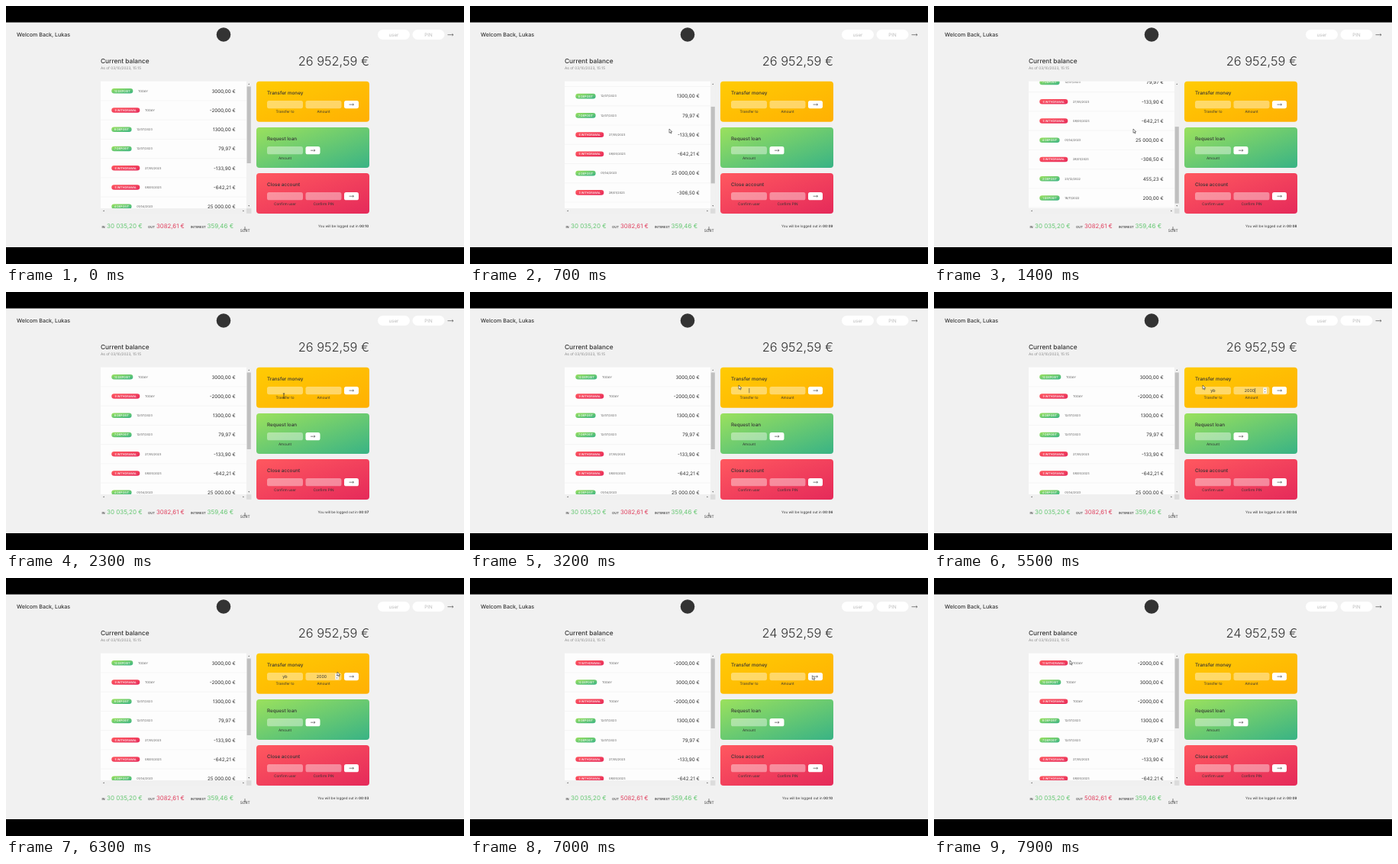
An HTML page for the animation above (8 s loop, 600 by 338 pixels).

```html
<!DOCTYPE html>
<html lang="en">
<head>
<meta charset="utf-8">
<title>Bank dashboard</title>
<style>
  html, body { margin: 0; width: 100%; height: 100%; overflow: hidden; background: #000; }
  svg { display: block; width: 100vw; height: 100vh; }
  text { font-family: Inter, "Open Sans", sans-serif; text-rendering: geometricPrecision; white-space: pre; }
</style>
</head>
<body>
<svg id="stage" viewBox="0 0 600 338">
  <defs id="defs"><clipPath id="view"><rect x="124" y="98.7" width="191" height="166.5"/></clipPath></defs>
  <rect width="600" height="338"/>
  <rect y="21.5" width="600" height="294.5" fill="#f1f1f1"/>
  <g id="page"></g>
  <rect x="124" y="98.7" width="191" height="166.5" fill="#fdfdfd"/>
  <g clip-path="url(#view)"><g id="rows"></g></g>
  <g id="bars"></g>
  <rect id="thumb" x="315.6" y="105.5" width="5.2" height="100.5" fill="#c0c0c0"/>
  <g id="live"></g>
  <path id="arrow" d="M0 0V5.3L1.3 4.2 2.2 6.1 3 5.7 2.2 3.9H3.8Z" fill="#fff" stroke="#222" stroke-width=".55"/>
  <path id="beam" d="M-1.2-3H1.2M0-3V3M-1.2 3H1.2" fill="none" stroke="#222" stroke-width=".7"/>
</svg>
<script>
const LOOP = 8000, PAY = 6800, PITCH = 25.25;
const $ = id => document.getElementById(id);

const text = (x, y, size, str, { fill = '#333', anchor = 'start', weight = 400 } = {}) =>
  `<text x="${x}" y="${y}" font-size="${size}" fill="${fill}" text-anchor="${anchor}" font-weight="${weight}">${str}</text>`;
const mid = (x, y, size, str, fill) => text(x, y, size, str, { fill, anchor: 'middle' });
const rect = (x, y, w, h, fill, r = 0, opacity = 1) =>
  `<rect x="${x}" y="${y}" width="${w}" height="${h}" rx="${r}" fill="${fill}" fill-opacity="${opacity}"/>`;
const line = (d, width = .8, color = '#333') => `<path d="${d}" fill="none" stroke="${color}" stroke-width="${width}"/>`;
const rightArrow = (x, y, len) => line(`M${x} ${y}h${len}m-1.5-1.3l1.5 1.3-1.5 1.3`, .6);
const triangle = (x, y, dx, dy, fill = '#555') =>
  `<path d="M${x + dx} ${y + dy}L${x - dx - dy} ${y - dy - dx}L${x - dx + dy} ${y - dy + dx}Z" fill="${fill}"/>`;

const gradients = {
  yellow: ['#ffcb03', '#ffb003'], green: ['#9be15d', '#39b385'], red: ['#ff585f', '#e52a5a'],
  deposit: ['#9be15d', '#39b385'], withdrawal: ['#ff585f', '#e52a5a']
};
$('defs').innerHTML += Object.entries(gradients).map(([id, [from, to]]) =>
  `<linearGradient id="${id}" x2="1" y2="1"><stop stop-color="${from}"/><stop offset="1" stop-color="${to}"/></linearGradient>`).join('');

function card(y, color, title, labels) {
  const fields = labels.map((label, i) =>
    rect(342 + 50.5 * i, y + 25.2, 47, 10.2, '#fff', 2.6, .4) + mid(365.5 + 50.5 * i, y + 41.6, 4.7, label)).join('');
  const x = 342 + 50.5 * labels.length;
  return rect(328, y, 148, 53, `url(#${color})`, 4) + text(342, y + 17.4, 6.3, title, { weight: 500 }) +
    fields + rect(x, y + 25.2, 19, 10.2, '#fff', 2.6) + rightArrow(x + 6.5, y + 30.3, 6);
}

$('page').innerHTML =
  text(14, 40, 7.1, 'Welcom Back, Lukas', { weight: 500 }) +
  '<circle cx="285" cy="37.5" r="9.3" fill="#333"/>' +
  rect(487, 31, 42, 13, '#fff', 6.5) + mid(508, 39.8, 6.2, 'user', '#bbb') +
  rect(532.5, 31, 42, 13, '#fff', 6.5) + mid(553.5, 39.8, 6.2, 'PIN', '#bbb') +
  rightArrow(578.5, 37.7, 7.5) +
  text(124, 74.6, 8.3, 'Current balance', { weight: 500 }) +
  text(124, 82.6, 4.8, 'As of 03/10/2023, 15:15', { fill: '#888' }) +
  card(98.8, 'yellow', 'Transfer money', ['Transfer to', 'Amount']) +
  card(158.9, 'green', 'Request loan', ['Amount']) +
  card(218.9, 'red', 'Close account', ['Confirm user', 'Confirm PIN']) +
  text(125.5, 290.6, 4.1, 'IN', { weight: 500 }) + text(132, 291.2, 8, '30 035,20 €', { fill: '#66c873' }) +
  text(186, 290.6, 4.1, 'OUT', { weight: 500 }) +
  text(242, 290.6, 4.1, 'INTEREST', { weight: 500 }) + text(263.5, 291.2, 8, '359,46 €', { fill: '#66c873' }) +
  mid(313.2, 296.3, 4.8, 'SORT') + line('M313 289v4.2m-1-1l1 1 1-1', .6);

$('bars').innerHTML =
  rect(315, 98.7, 6.4, 166.5, '#f1f1f1') + rect(124, 265.2, 191, 6.6, '#f0f0f0') +
  rect(315, 265.2, 6.4, 6.6, '#dcdcdc') +
  triangle(318.2, 102.2, 0, -.8) + triangle(318.2, 261.9, 0, .8) +
  triangle(127.8, 268.4, -.8, 0) + triangle(311.2, 268.4, .8, 0);

// Newest first
const moves = [
  ['TODAY', '-2000,00'], ['TODAY', '3000,00'], ['TODAY', '-2000,00'], ['12/07/2023', '1300,00'],
  ['12/07/2023', '79,97'], ['27/05/2023', '-133,90'], ['08/05/2023', '-642,21'], ['01/04/2023', '25 000,00'],
  ['28/01/2023', '-306,50'], ['23/12/2022', '455,23'], ['18/11/2022', '200,00']
];

function row([date, amount], i, list) {
  const y = 111.3 + PITCH * i, n = list.length - i;
  const kind = amount[0] === '-' ? 'withdrawal' : 'deposit';
  const w = kind === 'deposit' ? (n > 9 ? 28 : 26.3) : 37;
  return rect(138.3, y - 3.3, w, 6.6, `url(#${kind})`, 3.3) +
    text(138.3 + w / 2, y + 1.35, 3.7, `${n} ${kind.toUpperCase()}`, { fill: '#fff', anchor: 'middle', weight: 500 }) +
    text(145 + w, y + 1.3, 3.8, date, { fill: '#555' }) +
    text(300.7, y + 2.2, 6.3, amount + ' €', { anchor: 'end' }) +
    line(`M124 ${y + PITCH / 2}h191`, .5, '#ececec');
}

// Interpolates [time, value...] keys with a smooth ease
function track(keys, t) {
  const i = keys.findIndex(k => k[0] > t);
  if (i < 0) return keys[keys.length - 1].slice(1);
  if (!i) return keys[0].slice(1);
  const [a, b] = [keys[i - 1], keys[i]];
  const p = (t - a[0]) / (b[0] - a[0]), e = p * p * (3 - 2 * p);
  return a.slice(1).map((v, k) => v + (b[k + 1] - v) * e);
}

const scrollKeys = [[200, 0], [1200, 87], [1500, 87], [2050, 0]];
const cursorKeys = [
  [1550, 261, 161], [2200, 364, 136], [2350, 364, 136], [2900, 352, 122], [5650, 352, 122],
  [6250, 434, 123], [6400, 434, 123], [6700, 452, 128], [6950, 452, 128], [7700, 178, 108]
];
const typed = (str, start, step, t) => str.slice(0, Math.max(0, Math.floor((t - start) / step) + 1));

let paidShown = null;
function draw(t) {
  const paid = t >= PAY;
  if (paid !== paidShown) {
    $('rows').innerHTML = moves.slice(paid ? 0 : 1).map(row).join('');
    $('thumb').setAttribute('height', paid ? 91.5 : 100.5);
    paidShown = paid;
  }
  const [scroll] = track(scrollKeys, t);
  $('rows').setAttribute('transform', `translate(0 ${-scroll})`);
  $('thumb').setAttribute('y', 105.5 + scroll * .605);

  const secs = paid ? 10 - Math.floor((t - PAY) / 1000) : 10 - Math.floor((t + 800) / 1000);
  let live =
    text(476, 78.4, 16.4, paid ? '24 952,59 €' : '26 952,59 €', { anchor: 'end', weight: 300 }) +
    text(197, 291.2, 7.8, paid ? '5082,61 €' : '3082,61 €', { fill: '#e0405f' }) +
    text(475.3, 290.3, 4.55, `You will be logged out in <tspan font-weight="600">00:${String(secs).padStart(2, '0')}</tspan>`, { anchor: 'end' });

  if (!paid) {
    const user = typed('yb', 3800, 200, t), sum = typed('2000', 4750, 180, t);
    live += mid(365.5, 131.1, 5.5, user) + mid(413.5, 131.1, 5.3, sum);
    if (t >= 4500) {
      live += rect(431.3, 125.2, 4.6, 8, '#f4f4f4') + triangle(433.6, 127.3, 0, -.65) + triangle(433.6, 131.1, 0, .65);
    }
    const inSum = t >= 4500, typing = inSum ? t < 5600 && t > 4700 : t > 3800;
    if (t > 2350 && (typing || t % 1000 < 500) && t < 6000) {
      const x = inSum ? 413.5 + sum.length * 1.7 : 365.5 + user.length * 1.5;
      live += line(`M${x + .3} 126v6.4`, .6);
    }
  }
  $('live').innerHTML = live;

  const [x, y] = track(cursorKeys, t);
  const overField = t > 2100 && t < 2750;
  for (const id of ['arrow', 'beam']) {
    $(id).setAttribute('transform', `translate(${x} ${y})`);
    $(id).setAttribute('visibility', t >= 100 && overField === (id === 'beam') ? 'visible' : 'hidden');
  }
}

const start = performance.now();
function frame() {
  draw((performance.now() - start) % LOOP);
  requestAnimationFrame(frame);
}
frame();
</script>
</body>
</html>
```
